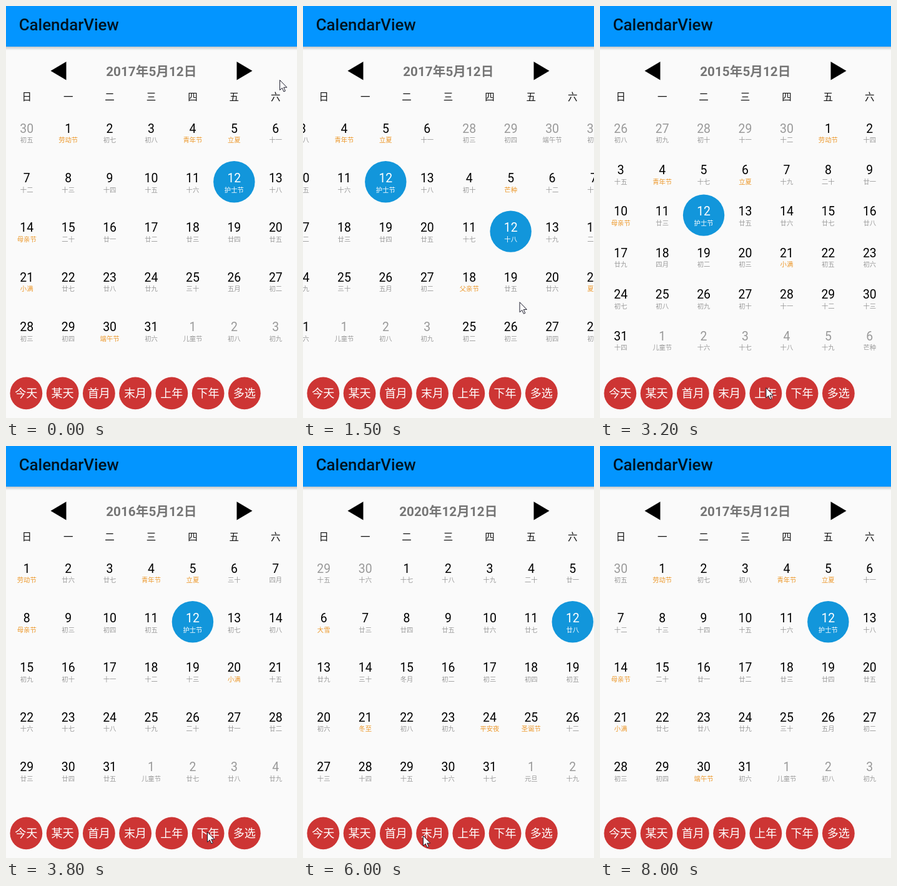
These frames come from a looping animation (466x659 px, 8.8 s). An HTML page with a canvas:

```html
<!DOCTYPE html>
<html lang="zh-CN">
<head>
<meta charset="utf-8">
<title>CalendarView</title>
<style>
html, body { margin: 0; width: 100%; height: 100%; overflow: hidden; background: #fafafa; }
canvas { display: block; width: 466px; height: 659px; }
</style>
</head>
<body>
<canvas id="stage"></canvas>
<script>
const W = 466, H = 659, LOOP = 8800, STEP = 100;
const DP = W / 360, COL = 465 / 7;
const FONT = 'Roboto, "Noto Sans CJK SC", "Noto Sans CJK", sans-serif';
const canvas = document.getElementById('stage');
const ratio = window.devicePixelRatio || 1;
canvas.width = W * ratio;
canvas.height = H * ratio;
const ctx = canvas.getContext('2d');

// Festivals by solar date, lunar date and nth Sunday of a month
const solarDays = { '1-1': '元旦', '5-1': '劳动节', '5-4': '青年节', '5-12': '护士节',
  '6-1': '儿童节', '7-1': '建党节', '12-24': '平安夜', '12-25': '圣诞节' };
const lunarDays = { '1-1': '春节', '5-5': '端午节', '12-8': '腊八节', '12-30': '除夕' };
const sundays = { '5-2': '母亲节', '6-3': '父亲节' };
// Mean day of each solar term in 2000, by month
const terms = {
  1: { 小寒: 5.41, 大寒: 20.12 }, 5: { 立夏: 5.52, 小满: 21.04 },
  6: { 芒种: 5.68, 夏至: 21.37 }, 12: { 大雪: 7.1, 冬至: 21.94 }
};
const lunarFormat = new Intl.DateTimeFormat('en-u-ca-chinese', { month: 'numeric', day: 'numeric' });

// Month shown from each time on
const views = [[0, 2017, 5], [800, 2017, 6], [1500, 2017, 5], [2800, 2016, 5], [3200, 2015, 5],
  [3800, 2016, 5], [4400, 2017, 5], [5300, 1990, 1], [6000, 2020, 12], [7500, 2017, 5]];

// Pointer moves: start, end, x, y
const moves = [[0, 400, 340, 340], [400, 800, 98, 365], [1000, 1700, 408, 500],
  [1800, 2200, 255, 609], [3100, 3500, 322, 617], [4300, 4800, 149, 632],
  [5200, 5600, 192, 623], [6200, 7000, 23, 634], [7500, 8000, 400, 680]];

function ease(t, from, to) {
  const u = Math.min(1, Math.max(0, (t - from) / (to - from)));
  return u * u * (3 - 2 * u);
}

function text(str, x, y, sp, color, weight = 400, align = 'center') {
  ctx.font = `${weight} ${sp * DP}px ${FONT}`;
  ctx.textAlign = align;
  ctx.fillStyle = color;
  ctx.fillText(str, x, y);
}

function disc(x, y, r, color) {
  ctx.fillStyle = color;
  ctx.beginPath();
  ctx.arc(x, y, r, 0, 7);
  ctx.fill();
}

function poly(points, fill) {
  ctx.beginPath();
  points.forEach(([x, y]) => ctx.lineTo(x, y));
  ctx.closePath();
  ctx.fillStyle = fill;
  ctx.fill();
}

function termOn(year, month, day) {
  const y = year - 2000;
  const leaps = Math.floor((month < 3 ? y - 1 : y) / 4);
  const list = Object.entries(terms[month] || {});
  const hit = list.find(([, mean]) => Math.floor(y * 0.2422 + mean) - leaps === day);
  return hit && hit[0];
}

function lunarName(month, day) {
  if (day === 1) return '正二三四五六七八九十冬腊'[month - 1] + '月';
  if (day % 10 === 0) return ['初十', '二十', '三十'][day / 10 - 1];
  return '初十廿'[Math.floor(day / 10)] + '一二三四五六七八九'[day % 10 - 1];
}

function describe(date) {
  const y = date.getFullYear(), m = date.getMonth() + 1, d = date.getDate();
  const parts = lunarFormat.formatToParts(date);
  const [lm, ld] = ['month', 'day'].map(type => parseInt(parts.find(p => p.type === type).value));
  const sunday = date.getDay() === 0 && sundays[`${m}-${Math.ceil(d / 7)}`];
  const festival = solarDays[`${m}-${d}`] || lunarDays[`${lm}-${ld}`] || sunday || termOn(y, m, d);
  return { festival, label: festival || lunarName(lm, ld) };
}

const cache = {};
function monthCells(y, m) {
  const key = `${y}-${m}`;
  if (cache[key]) return cache[key];
  const lead = new Date(y, m - 1, 1).getDay();
  const count = Math.ceil((lead + new Date(y, m, 0).getDate()) / 7) * 7;
  return cache[key] = Array.from({ length: count }, (_, i) => {
    const date = new Date(y, m - 1, i - lead + 1, 12);
    return { day: date.getDate(), inside: date.getMonth() === m - 1, ...describe(date) };
  });
}

function drawMonth(y, m, dx) {
  const cells = monthCells(y, m);
  const pitch = cells.length > 35 ? 66.4 : 79.4;
  cells.forEach(({ day, inside, festival, label }, i) => {
    const x = dx + COL * (i % 7 + 0.5);
    const cy = 201.8 + pitch * Math.floor(i / 7);
    const picked = inside && day === 12;
    if (picked) disc(x, cy, COL / 2, '#1296db');
    text(day, x, cy + 0.8, 15, picked ? '#fff' : inside ? '#000' : '#999');
    text(label, x, cy + 16.4, 8, picked ? '#fff' : inside && festival ? '#ec9729' : '#999');
  });
}

function drawFrame() {
  ctx.fillStyle = '#fafafa';
  ctx.fillRect(0, 0, W, H);
  const shade = ctx.createLinearGradient(0, 65, 0, 71);
  shade.addColorStop(0, 'rgba(0,0,0,.2)');
  shade.addColorStop(1, 'rgba(0,0,0,0)');
  ctx.fillStyle = shade;
  ctx.fillRect(0, 65, W, 6);
  ctx.fillStyle = '#0395ff';
  ctx.fillRect(0, 0, W, 65);
  text('CalendarView', 16 * DP, 39, 20, 'rgba(0,0,0,.87)', 500, 'left');
  for (const side of [-1, 1]) {
    const x = W / 2 + side * 136.5;
    poly([[x + side * 25, 103.8], [x, 89], [x, 118.6]], '#000');
  }
  [...'日一二三四五六'].forEach((c, i) => text(c, COL * (i + 0.5), 151, 12, '#111'));
  ['今天', '某天', '首月', '末月', '上年', '下年', '多选'].forEach((name, i) => {
    const x = (25 + 45 * i) * DP;
    disc(x, 619.4, 20 * DP, '#cd3534');
    text(name, x, 626.2, 14, '#fff');
  });
}

function drawPointer(t) {
  let x = 438, y = 118;
  for (const [from, to, tx, ty] of moves) {
    const k = ease(t, from, to);
    x += (tx - x) * k;
    y += (ty - y) * k;
  }
  const shape = [[0, 0], [0, 16], [3.7, 12.6], [6.4, 18.5], [8.8, 17.4], [6.2, 11.7], [11.3, 11.7]];
  poly(shape.map(([px, py]) => [x + 0.5 + px, y + 0.5 + py]), '#fff');
  ctx.strokeStyle = '#1b1b2b';
  ctx.lineWidth = 1;
  ctx.stroke();
}

function render(now) {
  const t = Math.floor(now % LOOP / STEP) * STEP;
  const [, year, month] = views.filter(v => v[0] <= t).pop();
  const swipe = W * (ease(t, 400, 950) - ease(t, 1300, 1700));
  ctx.setTransform(ratio, 0, 0, ratio, 0, 0);
  drawFrame();
  text(`${year}年${month}月12日`, W / 2 - 0.2, 111.5, 16, '#757575', 700);
  if (swipe > 0) {
    drawMonth(2017, 5, -swipe);
    drawMonth(2017, 6, W - swipe);
  } else {
    drawMonth(year, month, 0);
  }
  if (t < 8000) drawPointer(t);
}

const begin = performance.now();
function loop() {
  render(performance.now() - begin);
  requestAnimationFrame(loop);
}
loop();
</script>
</body>
</html>
```
